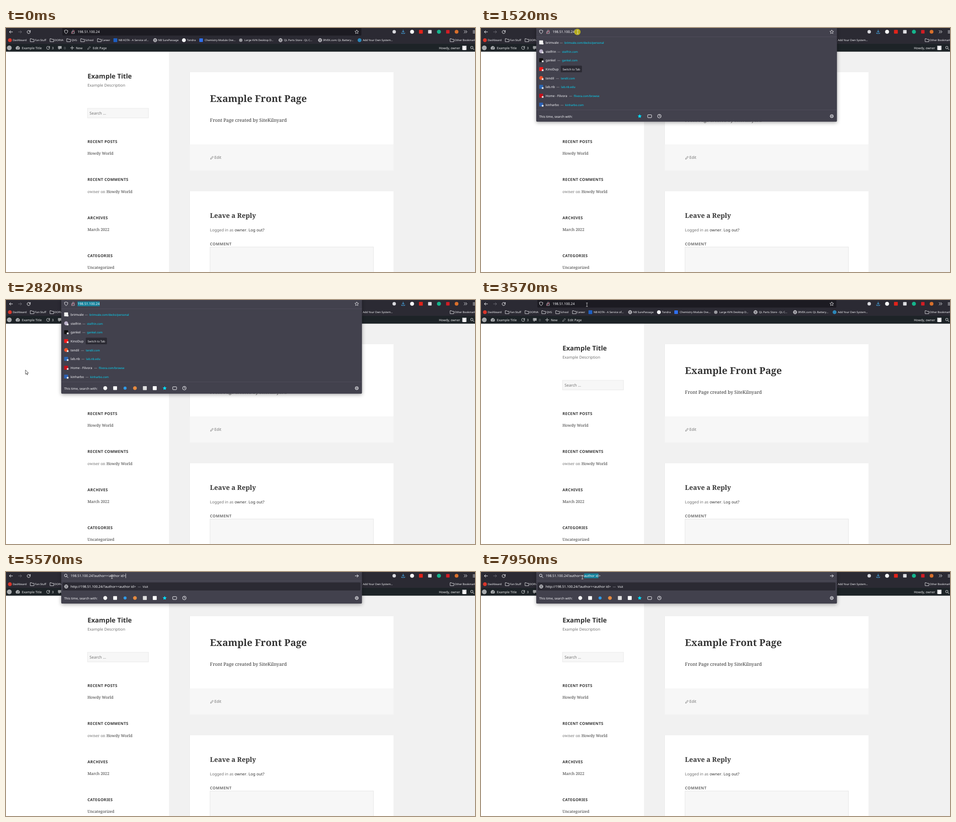
Write an HTML page that moves like this. It is 1036 px wide and 541 px high and loops after 8000 ms.

```html
<!DOCTYPE html>
<html lang="en">
<head>
<meta charset="utf-8">
<title>Browser address bar</title>
<style>
html, body { margin: 0; width: 100%; height: 100%; overflow: hidden; background: #f1f1f1; }
svg { display: block; width: 100vw; height: 100vh; }
text { font-family: "Noto Sans", sans-serif; text-rendering: geometricPrecision; white-space: pre; }
.serif { font-family: "Noto Serif", serif; }
.bold { font-weight: 700; }
.caps { font-weight: 700; letter-spacing: .04em; }
.shadow { filter: drop-shadow(0 2px 4px rgba(0, 0, 0, .35)); }
.card { filter: drop-shadow(0 0 .5px rgba(0, 0, 0, .25)); }
</style>
</head>
<body>
<svg id="stage" viewBox="0 0 1036 541" preserveAspectRatio="none"></svg>
<script>
const LIGHT = '#fbfbfe', INK = '#333', MUTED = '#707070', PANEL = '#42414d', CHROME = '#2b2a33';
const CYAN = '#00ddff', GREY = '#a7aaad';
const IP = '198.51.100.24';

const text = (x, y, size, str, fill = LIGHT, cls = '') =>
  `<text x="${x}" y="${y}" font-size="${size}" fill="${fill}" class="${cls}">${str.replace(/</g, '&lt;')}</text>`;
const rect = (x, y, w, h, fill, extra = '') =>
  `<rect x="${x}" y="${y}" width="${w}" height="${h}" fill="${fill}" ${extra}/>`;
const disc = (x, y, r, fill, extra = '') => `<circle cx="${x}" cy="${y}" r="${r}" fill="${fill}" ${extra}/>`;
const line = (d, color = LIGHT, w = 1, fill = 'none') =>
  `<path d="${d}" stroke="${color}" stroke-width="${w}" fill="${fill}" stroke-linecap="round" stroke-linejoin="round"/>`;
const group = (id, body) => `<g id="${id}">${body}</g>`;
const square = (x, y, s, fill) => rect(x - s / 2, y - s / 2, s, s, fill, 'rx="1"');

function star(x, y, r, fill, stroke = 'none') {
  const pts = Array.from({ length: 10 }, (_, i) => {
    const a = i * Math.PI / 5 - Math.PI / 2, q = i % 2 ? r * .48 : r;
    return `${(x + q * Math.cos(a)).toFixed(2)},${(y + q * Math.sin(a)).toFixed(2)}`;
  });
  return `<polygon points="${pts.join(' ')}" fill="${fill}" stroke="${stroke}" stroke-width=".8" stroke-linejoin="round"/>`;
}
const folder = x => line(`M${x} 30v-6.3h3l1.2 1.4h4.1v4.9z`, LIGHT, .8);
const globe = (x, y) => disc(x, y, 3.8, 'none', `stroke="${LIGHT}" stroke-width=".9"`) +
  line(`M${x - 3.8} ${y}h7.6M${x} ${y - 3.8}q-3.6 3.8 0 7.6q3.6 -3.8 0 -7.6`, LIGHT, .8);
const reload = (x, y, r, color, w) =>
  line(`M${x + r * .8} ${y - r * .6}A${r} ${r} 0 1 0 ${x + r} ${y + .4}M${x + r} ${y - r}v${r * .8}h${-r * .8}`, color, w);
const lens = (x, y, r, color, w) => disc(x, y, r, 'none', `stroke="${color}" stroke-width="${w}"`) +
  line(`M${x + r * .75} ${y + r * .75}l${r} ${r}`, color, w);
const pencil = (x, y, color) => line(`M${x - 3} ${y + 3}l.6 -2.2 4 -4 1.6 1.6 -4 4z`, color, .9);

function page() {
  let s = rect(0, 52, 1036, 489, '#f1f1f1') + rect(0, 52, 360, 489, '#fff');
  s += text(180, 111.9, 14.57, 'Example Title', INK, 'bold') + text(180, 129.6, 8.634, 'Example Description', MUTED);
  s += rect(180, 178, 134.7, 21.3, '#f7f7f7', 'stroke="#e3e3e3" stroke-width=".8"') + text(184.6, 192, 8.634, 'Search …', MUTED);
  [['RECENT POSTS', 'Howdy World'], ['RECENT COMMENTS', ''], ['ARCHIVES', 'March 2022'], ['CATEGORIES', 'Uncategorized']]
    .forEach(([head, item], i) => {
      const y = 254.9 + i * 84.4;
      s += text(180, y, 8.634, head, INK, 'caps') + text(180, y + 26.3, 8.634, item, INK, 'serif');
    });
  s += text(180, 365.5, 8.634, 'owner on', MUTED, 'serif') + text(222, 365.5, 8.634, 'Howdy World', INK, 'serif');
  s += rect(405.5, 98, 450.5, 218, '#fff', 'class="card"') + rect(405.5, 258, 450.5, 58, '#f7f7f7');
  s += text(450.6, 164.4, 21.05, 'Example Front Page', INK, 'serif bold');
  s += text(450.6, 207.8, 10.25, 'Front Page created by SiteKilnyard', INK, 'serif');
  s += pencil(454.9, 287.6, MUTED) + text(460.3, 290.4, 8.634, 'Edit', MUTED);
  s += rect(405.5, 362, 450.5, 200, '#fff', 'class="card"');
  s += text(450.6, 421.2, 14.57, 'Leave a Reply', INK, 'serif bold');
  s += text(450.6, 451.3, 8.7, 'Logged in as', MUTED) + text(505, 451.3, 8.7, 'owner', INK) +
    text(531, 451.3, 8.7, '.', MUTED) + text(535.8, 451.3, 8.7, 'Log out?', INK);
  s += text(450.6, 481.7, 8.634, 'COMMENT', MUTED, 'caps');
  return s + rect(450.8, 485.6, 361, 80, '#f7f7f7', 'stroke="#e0e0e0" stroke-width=".8"');
}

function siteBar() {
  let s = rect(0, 35, 1036, 17.5, '#1d2327') + disc(7.3, 44, 5.3, GREY);
  s += line('M22.4 47a4.3 4.3 0 1 1 7.2 0z', GREY, .8, GREY) + line('M26 45.6l1.6 -3', '#1d2327', .9);
  s += reload(93, 44, 3.4, GREY, 1.2);
  s += line('M115.5 40.5h7v5h-3.2l-2.2 2.4v-2.4h-1.6z', GREY, .8, GREY) + line('M142.6 44h7M146.1 40.5v7', GREY, 1.4);
  s += pencil(183.5, 44.2, GREY);
  [[35, 'Example Title'], [101.3, '3'], [154.3, 'New'], [191.8, 'Edit Page'], [956.2, 'Howdy, owner']]
    .forEach(([x, str]) => s += text(x, 46.5, 7.015, str, '#f0f0f1'));
  s += text(128, 46.5, 7.015, '0', '#8c9196');
  s += rect(1007.8, 39.3, 9.4, 9.4, '#dcdcde') + disc(1012.5, 42.8, 2, '#fff') + rect(1009, 45.3, 7, 3.4, '#fff', 'rx="1.8"');
  return s + lens(1029, 43.2, 2.6, GREY, 1.2);
}

function bookmarks() {
  let s = disc(8.6, 27, 4.3, '#d9362b');
  [53.6, 97.2, 134.2, 165, 202, 981].forEach(x => s += folder(x));
  [329.4, 606.4, 693.8].forEach(x => s += globe(x, 27));
  s += square(241.6, 27, 8.4, '#1d5fc4') + disc(393, 27, 4.3, '#f4f5f7') + square(431, 27, 8, '#2f6fed') +
    disc(518.6, 27, 3.8, '#9b9ba0') + disc(781, 27, 4.3, '#2b87b8');
  [[15, 'Dashboard'], [64, 'Fan Stuff'], [107, 'DORVA'], [144.4, 'QVG'], [175, 'School'], [211.4, 'Career'],
   [248.8, 'NB KOTA - A Service of...'], [336, 'NB SurePassage'], [399.6, 'Tondra'], [439, 'Chemistry Module Ove...'],
   [526.6, 'Large KVN Desktop D...'], [614, 'QL Parts Store - QL C...'], [700.2, 'IRVEK.com: QL Battery...'],
   [788.2, 'Add Your Own System...'], [991, 'Other Bookmarks']]
    .forEach(([x, str]) => s += text(x, 29.2, 5.936, str));
  return s;
}

function toolbar() {
  let s = rect(0, 0, 1036, 35.2, CHROME) + rect(124.5, -4, 660.5, 20.8, '#1c1b22', 'rx="2"');
  s += line('M14.5 8.7h-7M10.4 5.8l-3 2.9 3 2.9', LIGHT, 1) + line('M27.5 8.7h7M31.6 5.8l3 2.9-3 2.9', '#706f78', 1);
  s += reload(50.2, 8.8, 3.5, LIGHT, 1);
  s += disc(857.5, 8.4, 3.8, '#d8d8dd');
  s += line('M877.3 4.4v5M875 7.3l2.3 2.3 2.3-2.3M873.8 10.6v1.6h7v-1.6', '#4bb4f5', 1);
  s += disc(897, 8.4, 4.4, '#f7f7f7') + square(916.5, 8.4, 8.4, '#e2231a');
  s += square(936.3, 8.4, 7.8, '#dedee2') + disc(956.3, 8.4, 4.4, '#15b58c') + square(976, 8.4, 7.6, '#d31d24');
  s += disc(995.3, 8.4, 4.1, '#d9702b');
  return s + line('M1012 5.6l2.8 2.8-2.8 2.8M1015.6 5.6l2.8 2.8-2.8 2.8', LIGHT, 1) +
    line('M1031.6 6h8M1031.6 8.6h8M1031.6 11.2h8', LIGHT, .9);
}

const panelBox = h => rect(122, -6, 664.3, h + 6, PANEL, 'rx="2" class="shadow"');

function rows() {
  const items = [
    ['brimvale', 184.3, 'brimvale.com/decks/personal', '#f2f2f2', 0], ['stelfrin', 179, 'stelfrin.com', '#b9b0c8', 1],
    ['gankel', 179, 'gankel.com', '#111', 0], ['KinoDup', 0, '', '#f01818', 0], ['tendil', 176.2, 'tendil.com', '#f0512b', 1],
    ['lab.nb', 177, 'lab.nb.edu', '#2a66b4', 0], ['Home - Filvora', 205, 'filvora.com/browse', '#c4101a', 0],
    ['kinharbo', 186, 'kinharbo.com', '#2c62b5', 0]];
  const dash = (x, y) => text(x - 10.6, y, 7.015, '—', '#b5b5be');
  let s = line('M122.5 19.6h663.3M122.5 181.6h663.3', '#53525e', .8);
  items.forEach(([name, x, url, color, round], i) => {
    const y = 32.2 + i * 19.7, base = y + 2.6;
    s += round ? disc(132.8, y - .3, 4.3, color) : square(132.8, y - .3, 8.6, color);
    s += star(136.2, y + 2.4, 2.9, '#fff') + text(142.8, base, 7.015, name);
    if (url) s += dash(x, base) + text(x, base, 6.27, url, CYAN);
  });
  s += group('chip', rect(176.2, 83.6, 46.8, 14.6, CHROME, 'rx="1.5"') + text(180.2, 93.5, 6.25, 'Switch to Tab'));
  return s + group('chipUrl', dash(185.6, 93.9) + text(185.6, 93.9, 6.27, 'kinodup.com', CYAN));
}

function footer() {
  let gear = disc(774.8, 195.5, 2.9, 'none', `stroke="${LIGHT}" stroke-width="1"`) + disc(774.8, 195.5, 1.1, LIGHT);
  for (let i = 0; i < 8; i++) gear += `<path d="M774.8 191.4v1.2" stroke="${LIGHT}" stroke-width="1.4" transform="rotate(${i * 45} 774.8 195.5)"/>`;
  const engines = disc(219.2, 195.4, 4.3, '#f5f5f5') + square(241, 195.4, 8.4, '#fff') + disc(263, 195.4, 3.4, '#2f9be8') +
    disc(284.8, 195.4, 4.2, '#e5893f') + square(306.7, 195.4, 8.6, '#dedede') + square(328.6, 195.4, 8.6, '#fff');
  return text(128.4, 198.5, 7.06, 'This time, search with:') + group('engines', engines) +
    star(350.5, 195.6, 4.7, CYAN) +
    rect(368.2, 192.4, 8.6, 6.4, 'none', `rx="1" stroke="${LIGHT}" stroke-width="1"`) +
    disc(394, 195.4, 4, 'none', `stroke="${LIGHT}" stroke-width="1"`) + line('M394 192.9v2.7h1.9', LIGHT, .9) + gear;
}

const visit = line('M122.5 19.6h663.3', '#53525e', .8) + rect(125, 23.2, 658, 17.8, CHROME, 'rx="2"') + globe(133, 32.2) +
  text(142.8, 34.9, 7.39, `http://${IP}/?author=<author id>`) +
  text(291, 34.7, 7.015, '—', '#b5b5be') + text(301.8, 34.7, 6.3, 'Visit');

const plainField = line('M132.8 4.5l3.8 1.3q0 5 -3.8 6.9q-3.8 -1.9 -3.8 -6.9z', LIGHT, .9) +
  line('M145.5 8.3h5.6v3.9h-5.6zM146.5 8.2v-1.6a1.8 1.8 0 0 1 3.6 0v1.6', '#c6c6cc', .9) +
  line('M144.8 12.4l6.6-7.2', '#e8436a', .9) + star(774.8, 8.7, 4.4, 'none', LIGHT) + text(158, 11.2, 7.5, IP);
const typedField = lens(132, 7.6, 2.9, LIGHT, 1) + line('M771.4 8.6h7M775.4 5.6l3 3-3 3', LIGHT, 1) +
  text(142.8, 11.2, 7.5, `${IP}?author=<author id>`);

document.getElementById('stage').innerHTML =
  page() + siteBar() + toolbar() + bookmarks() +
  group('list', panelBox(207.8) + rows()) +
  group('short', panelBox(70) + visit) + group('footer', footer()) +
  rect(0, 3.2, 0, 10.6, '#14809a', 'id="mark"') +
  group('plain', plainField) + group('typed', typedField) +
  rect(0, 3.4, .8, 10, LIGHT, 'id="caret"') +
  disc(0, 0, 7, '#b3aa1c', 'id="press"') +
  group('arrow', line('M0 0v9l2.1-1.9 1.5 3.4 1.5-.7-1.5-3.2h2.7z', '#222', .8, '#fff')) +
  group('beam', line('M-1.6 -4h1.1l.5.5.5-.5h1.1M0 -3.5v7M-1.6 4h1.1l.5-.5.5.5h1.1', '#e6e6e6', .8));

const LOOP = 8000;
// start, end, steps, from x, y, to x, y
const MOVES = [
  [110, 910, 12, 1017, 477, 214, 59], [980, 1380, 6, 214, 50, 213.6, 9],
  [1590, 1730, 3, 205, 9, 166, 9], [1790, 1930, 3, 160, 9, 151, 9],
  [2130, 2200, 2, 151, 10, 150, 11], [2400, 2820, 7, 146, 20, 43, 155.5],
  [3090, 3160, 2, 100, 98, 179, 42], [3230, 3570, 6, 190, 36, 234, 10.5],
  [5900, 6040, 3, 236, 10.5, 242, 10.5], [6240, 6540, 5, 246, 10, 270, 10],
  [6600, 6740, 3, 266, 10, 259, 10], [7000, 7480, 8, 255, 9.5, 227, 9.5],
  [7950, 8000, 1, 224, 11.5, 224, 11.5]];

const el = id => document.getElementById(id);
const show = (id, on) => el(id).setAttribute('display', on ? 'inline' : 'none');
const put = (id, x, y) => el(id).setAttribute('transform', `translate(${x} ${y})`);
const within = (t, ...spans) => spans.some(([a, b]) => t >= a && t < b);

function pointer(t) {
  const move = MOVES.filter(m => t >= m[0]).pop();
  if (!move) return null;
  const [t0, t1, n, x0, y0, x1, y1] = move;
  const step = Math.min(n - 1, Math.floor((t - t0) / (t1 - t0) * (n - 1) + 1e-6));
  const p = n > 1 ? step / (n - 1) : 0, e = p * p * (3 - 2 * p);
  return { x: x0 + (x1 - x0) * e, y: y0 + (y1 - y0) * e };
}

function selection(t, x) {
  if (within(t, [1590, 3020])) return [t < 1930 ? Math.min(207, Math.max(158, x)) : 158, 207];
  if (within(t, [3910, 4570])) return [158, 207];
  if (t >= 7000) return [Math.min(259.4, Math.max(227.8, x)), 259.4];
  return [0, 0];
}

function caretX(t) {
  if (within(t, [1520, 1590], [4570, 4840])) return 207.2;
  if (within(t, [5370, 5900], [6400, 6740])) return 264.2;
  return within(t, [6740, 7000]) ? 259.4 : 0;
}

function draw(t) {
  const list = within(t, [1520, 3020], [3840, 5440]), typed = t >= 5370, short = t >= 5440;
  show('list', list);
  show('short', short);
  show('footer', list || short);
  put('footer', 0, short ? -137.8 : 0);
  show('engines', within(t, [1590, 3020], [3910, LOOP]));
  show('chip', t < 5110);
  show('chipUrl', t >= 5110);
  show('plain', !typed);
  show('typed', typed);

  const at = pointer(t);
  const [a, b] = selection(t, at ? at.x : 0);
  el('mark').setAttribute('x', a);
  el('mark').setAttribute('width', b - a);
  const caret = caretX(t);
  show('caret', caret);
  el('caret').setAttribute('x', caret);

  show('press', at && within(t, [1450, 2130], [2950, 3020], [3770, 3910], [4570, 4640], [6740, 7880]));
  show('arrow', at && at.y > 17);
  show('beam', at && at.y <= 17);
  if (at) {
    put('press', at.x - .6, at.y - .3);
    put('arrow', at.x, at.y);
    put('beam', at.x, at.y);
  }
}

const start = performance.now();
function tick() {
  draw((performance.now() - start) % LOOP);
  requestAnimationFrame(tick);
}
tick();
</script>
</body>
</html>
```
